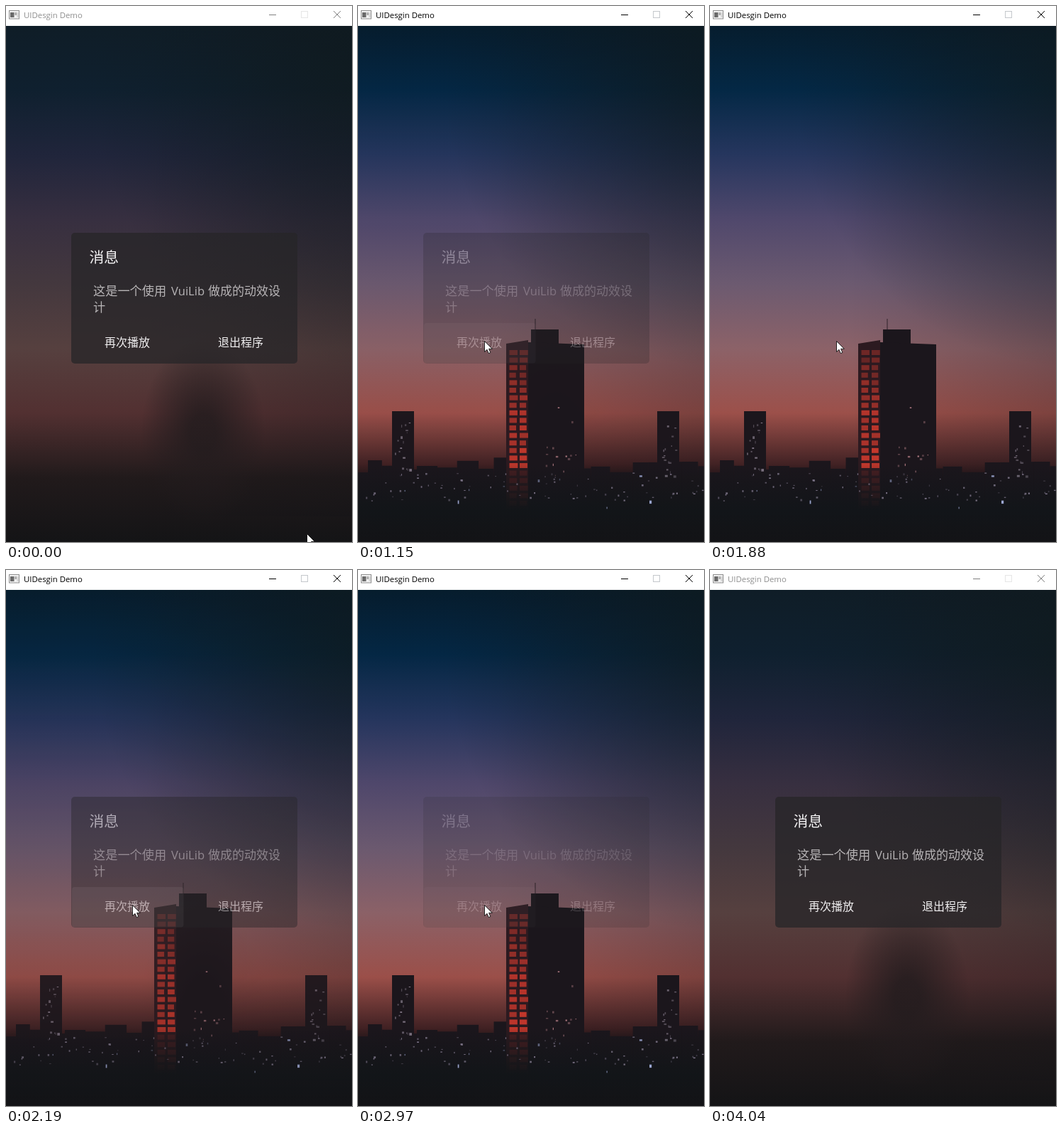
An HTML page that plays this animation: 488 by 754 pixels, repeating every 4070 ms.

```html
<!DOCTYPE html>
<html lang="zh-CN">
<head>
<meta charset="utf-8">
<title>UIDesgin Demo</title>
<style>
  html, body { margin: 0; width: 100%; height: 100%; overflow: hidden; background: #141518; }
  svg { display: block; width: 100vw; height: 100vh; }
  text { font-family: "Noto Sans CJK SC", "Noto Sans CJK", "Noto Sans", sans-serif; }
  .latin { font-family: "Open Sans", "Noto Sans", sans-serif; }
</style>
</head>
<body>
<svg viewBox="0 0 488 754">
  <defs>
    <linearGradient id="sky" x2="0" y2="1"></linearGradient>
    <linearGradient id="haze" x2="0" y2="1"></linearGradient>
    <linearGradient id="side">
      <stop offset=".4" stop-color="#101216" stop-opacity="0"/>
      <stop offset="1" stop-color="#101216" stop-opacity=".22"/>
    </linearGradient>
    <radialGradient id="corner" gradientUnits="userSpaceOnUse" cx="520" cy="110" r="400">
      <stop offset="0" stop-color="#101a1c" stop-opacity=".65"/>
      <stop offset="1" stop-color="#101a20" stop-opacity="0"/>
    </radialGradient>
    <radialGradient id="shade">
      <stop offset=".2" stop-color="#231c1e" stop-opacity=".85"/>
      <stop offset="1" stop-color="#231c1e" stop-opacity="0"/>
    </radialGradient>
    <linearGradient id="dusk">
      <stop offset="0" stop-color="#121519" stop-opacity="0"/>
    </linearGradient>
    <linearGradient id="ground" x2="0" y2="1">
      <stop offset="0" stop-color="#121519" stop-opacity="0"/>
      <stop offset=".6" stop-color="#121519"/>
      <stop offset="1" stop-color="#131316"/>
    </linearGradient>
    <g id="dim">
      <rect y="28" width="488" height="690" fill="url(#side)"/>
      <rect y="28" width="488" height="726" fill="url(#corner)"/>
    </g>
  </defs>

  <rect y="28" width="488" height="726" fill="url(#sky)"/>
  <use href="#dim"/>
  <g id="city"></g>

  <g id="blur">
    <rect y="28" width="488" height="726" fill="url(#haze)"/>
    <use href="#dim"/>
    <ellipse cx="278" cy="600" rx="88" ry="130" fill="url(#shade)"/>
  </g>

  <g id="dialog">
    <rect x="92" y="319" width="319" height="184" rx="5" fill="#272528" fill-opacity=".76"/>
    <rect id="hover" x="93" y="446" width="157.5" height="56.5" rx="4" fill="#fff"/>
    <text x="117.5" y="361" font-size="20.8" fill="#f4f3f4">消息</text>
    <g font-size="17.2" fill="#b7b4b6">
      <text x="123" y="407">这是一个使用</text>
      <text class="latin" x="233" y="407" font-size="16.6">VuiLib</text>
      <text x="285" y="407" font-size="17">做成的动效设</text>
      <text x="123" y="430">计</text>
    </g>
    <g font-size="16" fill="#f0eff0">
      <text x="139" y="478.5">再次播放</text>
      <text x="299" y="478.5">退出程序</text>
    </g>
  </g>

  <path id="cursor" d="M.5 .5V15.5L4 12.3L6.3 17.6L8.8 16.5L6.6 11.3H11.3Z" fill="#fff" stroke="#111" stroke-width=".9"/>

  <rect width="488" height="28" fill="#fff"/>
  <rect x="4.5" y="6.5" width="14" height="11.5" fill="#f2f2f2" stroke="#8d8d8d"/>
  <rect x="6" y="9" width="5.5" height="7" fill="#6a6a6a"/>
  <rect x="12.5" y="9" width="2.5" height="4" fill="#a8a8a8"/>
  <rect x="15.5" y="9" width="2" height="7" fill="#cfcfcf"/>
  <text id="title" class="latin" x="25" y="17" font-size="11.4">UIDesgin Demo</text>
  <path id="controls" d="M371 12.5H381M462 7L472 17M472 7L462 17"/>
  <rect id="maximize" x="416.5" y="7.5" width="9" height="9" fill="none"/>
</svg>

<script>
const $ = id => document.getElementById(id);
const set = (id, attrs) => { for (const k in attrs) $(id).setAttribute(k, attrs[k]); };
const part = (t, from, to) => Math.min(1, Math.max(0, (t - from) / (to - from)));
const LOOP = 4070;

// Evenly spaced vertical gradient
function ramp(id, colours) {
  $(id).innerHTML = colours.map((c, i) =>
    `<stop offset="${i / (colours.length - 1)}" stop-color="${c}"/>`).join("");
}
ramp("sky", ["#061d2e", "#042845", "#26365e", "#50486c", "#6c5a70", "#8c6268", "#9c504a", "#2a161a", "#121316"]);
ramp("haze", ["#0f1d27", "#0f202f", "#20253b", "#372f40", "#44383e", "#56403f", "#523031", "#211a1b", "#141416"]);

function buildCity() {
  let seed = 7, out = "";
  const rand = (a, b) => a + (b - a) * (seed = seed * 16807 % 2147483647) / 2147483647;
  const box = (x, y, w, h, fill, o = 1) =>
    out += `<rect x="${x}" y="${y}" width="${w}" height="${h}" fill="${fill}" opacity="${o}"/>`;
  // Lights scattered over an area
  const lights = (n, x, y, w, h, size, fill) => {
    while (n--) box(rand(x, x + w), rand(y, y + h), rand(1, size), rand(1, size), fill, rand(.3, 1));
  };
  const dark = "#1b161c";

  for (let x = 0, w; x < 488; x += w) {
    w = rand(14, 34);
    const y = rand(634, 658);
    box(x, y, w, 718 - y, dark);
  }
  for (const x of [48, 422]) {
    box(x, 570, 31, 148, dark);
    lights(16, x + 4, 576, 22, 85, 4, "#8f8494");
  }

  // Main tower: lit front, dark flank, roof block
  box(249.5, 440, 1, 18, "#30222a");
  box(244, 455, 39, 24, dark);
  out += `<path d="M209 475L240 470V712H209Z" fill="#2c1a20"/><path d="M240 473L319 476V712H240Z" fill="${dark}"/>`;
  for (let y = 484; y < 702; y += 10.6) {
    const glow = y < 645 ? .4 + .55 * part(y, 480, 590) : .2;
    for (const x of [213.5, 228]) box(x, y, rand(9, 12), 7, "#cf3a2e", glow * rand(.75, 1));
  }
  lights(14, 264, 540, 45, 130, 3.5, "#b88088");

  box(0, 645, 488, 109, "url(#ground)");
  lights(80, 0, 656, 486, 40, 3, "#80788c");
  lights(9, 30, 657, 400, 58, 5, "#a4b0dc");
  $("city").innerHTML = out;
}

// Each replay: button pressed, dialog hidden, fade-in begins
const replays = [[820, 960, 1070], [1750, 1800, 2050], [2720, 2770, 2920]];

const shown = t => Math.min(...replays.map(([, cut, start]) =>
  Math.max(1 - part(t, cut, cut + 70), part(t, start, start + 250))));

const pressed = t => Math.max(...replays.map(([down, cut]) =>
  Math.min(part(t, down, down + 90), 1 - part(t, cut, cut + 100))));

function draw(t) {
  const p = shown(t), active = t >= 830 && t < 4040;
  const enter = part(t, 30, 480), settle = part(t, 650, 760), leave = part(t, 3120, 3700);
  const x = 424 - 255 * enter + 9 * settle + 267 * leave;
  const y = 742 - 285 * enter + 14 * settle + 285 * leave ** 1.6;
  const hover = settle * (1 - part(t, 3130, 3170));

  set("blur", { opacity: p ** 3 });
  set("dialog", { opacity: p });
  set("hover", { "fill-opacity": .09 * (hover + pressed(t)) });
  set("cursor", { transform: `translate(${x} ${y})` });
  set("title", { fill: active ? "#000" : "#8f8f8f" });
  set("controls", { stroke: active ? "#000" : "#808080" });
  set("maximize", { stroke: active ? "#c4c8cc" : "#e6e6e6" });
}

buildCity();
const began = performance.now();
function tick() {
  draw((performance.now() - began) % LOOP);
  requestAnimationFrame(tick);
}
tick();
</script>
</body>
</html>
```
